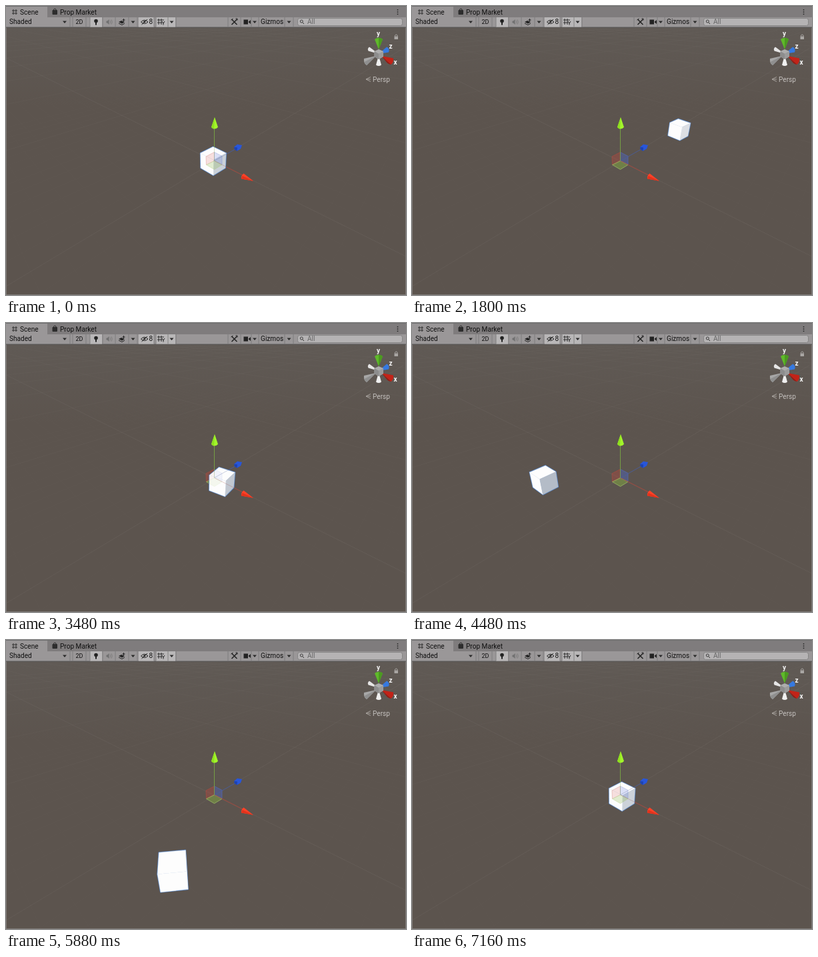
Animation of 600 by 434 pixels, one loop 7200 ms. Source, as an HTML page:

```html
<!DOCTYPE html>
<html lang="en">
<head>
<meta charset="utf-8">
<title>Cube on a figure eight</title>
<style>
  html, body { margin: 0; width: 100%; height: 100%; overflow: hidden; background: #5c544e; }
  svg { display: block; width: 600px; height: 434px; }
  text { font: 10.1px Roboto, "Liberation Sans", Arial, sans-serif; fill: #101010; }
  .axis { font-weight: bold; fill: #f4f4f4; }
</style>
</head>
<body>
<svg viewBox="0 0 600 434">
  <defs>
    <linearGradient id="haze" x2="0" y2="1">
      <stop offset=".07" stop-color="#605a55"/>
      <stop offset=".35" stop-color="#5c544e"/>
    </linearGradient>
  </defs>
  <rect width="600" height="434" fill="url(#haze)"/>
  <g id="grid" stroke="#fff" fill="none"/>

  <!-- move handle, lower part -->
  <g id="planes" stroke-width=".8">
    <path d="M300 226L312.5 219.500V232.500L300.500 238.500Z" fill="#d0483c" fill-opacity=".27" stroke="#c4473c" stroke-opacity=".55"/>
    <path d="M312.500 219.500L324 225.500V238L312.500 232.500Z" fill="#4a68d8" fill-opacity=".32" stroke="#5570cc" stroke-opacity=".6"/>
    <path d="M312.500 232.500L324 238.500L312.500 245.500L300.500 238.500Z" fill="#86b440" fill-opacity=".4" stroke="#a5c86a" stroke-opacity=".75"/>
  </g>
  <g id="shafts" fill="none" stroke-width=".9">
    <path d="M312.500 232.500L355 254" stroke="#a04a40"/>
    <path d="M312.500 232.500L344 215" stroke="#4a5b92"/>
    <path d="M312.500 232.500V183" stroke="#79a545"/>
  </g>

  <g id="cube" stroke-linejoin="round">
    <path id="edge" fill="none" stroke="#4d7fc4" stroke-width="1.8"/>
    <g id="faces" stroke-width=".4"></g>
  </g>

  <!-- move handle, upper part -->
  <use id="ghost" href="#planes"/>
  <use href="#shafts" opacity=".3"/>
  <path d="M312.500 184V180" stroke="#80b83e"/>
  <path d="M313 167L318 182Q313 187 308 182Z" fill="#a2f52a"/>
  <path d="M313 167L308 182Q310 184.500 312 184.700Z" fill="#8fe01f"/>
  <path d="M356.500 251.500Q352.500 254 353 259.500L371 262.800Z" fill="#ff4127"/>
  <path d="M353 259.500L371 262.800L354.500 255Z" fill="#e0331d"/>
  <path d="M342 212L347 207.800L354 209L352 214.500L346.500 217.800L343 215.500Z" fill="#2856da"/>
  <path d="M342 212L347 212.500L346.500 217.800L343 215.500Z" fill="#1d43b0"/>

  <!-- orientation widget -->
  <g>
    <path d="M559 72L545 61.500Q541.500 64 543.500 67.500Z" fill="#e6e6e6"/>
    <path d="M559 72L571 61.500Q576 63.500 574 69.500Z" fill="#3679e0"/>
    <path d="M559 65L553 50Q559 45.500 565 50Z" fill="#5fb92a"/>
    <path d="M559 65L559 47.500Q563 47.500 565 50Z" fill="#4b9a20"/>
    <path d="M555 75L541 89Q536 86 537 79Z" fill="#a7a7a7"/>
    <path d="M555 75L541 89Q538 87 537.500 84Z" fill="#8f8f8f"/>
    <path d="M563 75L581 78.500Q582 84 577.500 88Z" fill="#c22318"/>
    <path d="M563 75L577.500 88Q574.500 87.500 572 85.500Z" fill="#96180f"/>
    <path d="M559 74L555 88.500Q559 91.500 563 88.500Z" fill="#f0f0f0"/>
    <path d="M552.500 68L559 65L566 68V76L559 80L552.500 76Z" fill="#adadad"/>
    <path d="M552.500 68L559 71.500V80L552.500 76Z" fill="#8d8d8d"/>
    <path d="M566 68L559 71.500V80L566 76Z" fill="#9b9b9b"/>
    <text class="axis" x="556" y="45">y</text>
    <text class="axis" x="574.500" y="64">z</text>
    <text class="axis" x="581.500" y="88">x</text>
    <rect x="582.500" y="45.500" width="5.500" height="4.500" fill="#a9a6a3"/>
    <path d="M583.500 45.500V44Q585.200 41.500 587 44V45.500" fill="none" stroke="#a9a6a3"/>
    <path d="M547 106.500L540 110L547 113.500M540 110H547" fill="none" stroke="#b0aca8" stroke-width=".9"/>
    <text x="550" y="113.500" style="fill:#c4c1be">Persp</text>
  </g>

  <!-- window frame, tabs -->
  <path d="M.5 17V434M599.500 17V434M0 433.500H600" stroke="#7b7774"/>
  <rect width="600" height="17" fill="#7f7c7d"/>
  <rect width="600" height="1" fill="#6d6d6d"/>
  <rect y="1" width="62" height="16" fill="#9a9798"/>
  <path d="M11 5V13M15 5V13M9 7H17M9 11H17" stroke="#333"/>
  <text x="21" y="12.800">Scene</text>
  <rect x="69.500" y="6" width="7.500" height="7" rx="1" fill="#2d2d2d"/>
  <path d="M71.500 6V5Q73.200 3 75 5V6" fill="none" stroke="#2d2d2d"/>
  <text x="81" y="12.800">Prop Market</text>
  <path d="M587.500 5V13" stroke="#222" stroke-width="1.500" stroke-dasharray="1.500 1.700"/>

  <!-- toolbar -->
  <rect y="17" width="600" height="15" fill="#9a9798"/>
  <path d="M0 32H600" stroke="#555"/>
  <g fill="#b9b7b8">
    <rect x="126" y="17" width="18" height="14.500"/>
    <rect x="199" y="17" width="23" height="14.500"/>
    <rect x="225" y="17" width="29" height="14.500"/>
  </g>
  <path id="seps" stroke="#787878" stroke-width=".8"/>
  <path id="downs" fill="#2a2a2a"/>
  <text x="5" y="27.300">Shaded</text>
  <text x="104.500" y="27.300" style="font-size:9px">2D</text>
  <circle cx="135" cy="22.500" r="2.800" fill="#222"/>
  <path d="M135 24V28.500" stroke="#222" stroke-width="2"/>
  <path d="M150.500 22.500H152L154.500 20V28L152 25.500H150.500Z" fill="#707070"/>
  <path d="M156 21.500Q158 24 156 26.500M158 20.500Q160.500 24 158 27.500" fill="none" stroke="#777" stroke-width=".8"/>
  <path d="M169 24L173 22L178 24L174 26.500Z" fill="#222"/>
  <path d="M169 26L174 28.500L178 26M176.500 19V23M174.500 21H178.500" fill="none" stroke="#222"/>
  <path d="M202.500 24Q207.500 18.500 213 24Q207.500 29 202.500 24ZM203.500 28L212 20" fill="none" stroke="#222"/>
  <circle cx="207.700" cy="23.800" r="1.500" fill="#222"/>
  <text x="214.500" y="27.300">8</text>
  <path d="M229 19V28M233 19V28M227 21H237M227 25H234" stroke="#222" stroke-width=".9"/>
  <path d="M234 23L236 26L238 23M236 26V28.500" fill="none" stroke="#222"/>
  <path d="M338.500 20L346.500 28M346.500 20L338.500 28" stroke="#222" stroke-width="1.500"/>
  <path d="M337.500 21L340.500 19M344.500 19H347V21.500" fill="none" stroke="#222"/>
  <path d="M356.500 20.500H363V27.500H356.500ZM363.500 24L367 21V27Z" fill="#222"/>
  <text x="382" y="27.300">Gizmos</text>
  <rect x="437.500" y="18.500" width="157" height="11" rx="3" fill="#b5b3b4" stroke="#7d7d7d" stroke-width=".8"/>
  <circle cx="443.300" cy="23" r="2" fill="none" stroke="#333" stroke-width=".9"/>
  <path d="M444.700 24.500L447 27" stroke="#333"/>
  <text x="452" y="27.200" style="fill:#666">All</text>
</svg>

<script>
const NS = "http://www.w3.org/2000/svg";
const byId = id => document.getElementById(id);
const add = (parent, name) => parent.appendChild(document.createElementNS(NS, name));
const rad = deg => deg * Math.PI / 180;

// Camera
const FOCAL = 348, DIST = 12.3, SHIFT = 0.4525;
const SP = Math.sin(rad(33)), CP = Math.cos(rad(33));
const SY = Math.sin(rad(43.2)), CY = Math.cos(rad(43.2));
const EYE = [-CY * SHIFT + SY * CP * DIST, SP * DIST, -SY * SHIFT - CY * CP * DIST];
const LIGHT = [0.32, 0.766, -0.557];
const SIZE = 0.945; // cube edge and floor unit

function project([x, y, z]) {
  const side = SHIFT + CY * x + SY * z;
  const ahead = CY * z - SY * x;
  const depth = DIST + CP * ahead - SP * y;
  return [300 + FOCAL * side / depth, 233.4 - FOCAL * (SP * ahead + CP * y) / depth];
}

const dot = (a, b) => a[0] * b[0] + a[1] * b[1] + a[2] * b[2];
const pathOf = pts => "M" + pts.map(p => p.map(v => v.toFixed(2)).join(" ")).join("L");

// Floor lines, clipped just in front of the camera
function drawGrid(spacing, count, reach, alpha) {
  for (let k = -count; k <= count; k++) {
    const c = k * spacing * SIZE;
    const zNear = (-13 + SY * c) / CY, xNear = (13 + CY * c) / SY;
    for (const ends of [[[c, 0, zNear], [c, 0, reach]], [[xNear, 0, c], [-reach, 0, c]]]) {
      const line = add(byId("grid"), "path");
      line.setAttribute("d", pathOf(ends.map(project)));
      line.setAttribute("stroke-opacity", alpha);
    }
  }
}

function drawToolbar() {
  byId("seps").setAttribute("d", [96, 100, 120, 126, 145, 164, 184, 197, 222, 225, 243, 255, 333, 352, 368, 379, 418, 431]
    .map(x => `M${x} 17V31.5`).join(""));
  byId("downs").setAttribute("d", [88, 190.5, 248.5, 373, 424.5]
    .map(x => `M${x - 3} 22.5H${x + 3}L${x} 26Z`).join(""));
}

// Two touching circles, one lap each; the cube faces along its path
const RADIUS = 2.84, LAP = 3600, LOOP = 2 * LAP, STEP = 40;

function pose(t) {
  const way = t < LAP ? 1 : -1;
  const turn = (t % LAP) / LAP * 360;
  const lead = way > 0 ? 2 + 3 * Math.sin(rad(turn / 2)) : 2;
  const a = rad(turn + lead);
  return {
    pos: [-RADIUS * Math.sin(a), 0, way * RADIUS * (1 - Math.cos(a))],
    dir: [-Math.cos(a), 0, way * Math.sin(a)]
  };
}

function shade(normal, pos) {
  const toEye = EYE.map((v, i) => v - pos[i]);
  const facing = Math.max(0, dot(normal, toEye)) / Math.hypot(...toEye);
  const dim = Math.max(0, 0.5 - dot(normal, LIGHT)) * facing * 500;
  return `rgb(${[1.08, 0.96, 0.8].map(k => Math.round(253 - dim * k)).join()})`;
}

const faceNodes = [0, 1, 2, 3, 4].map(() => add(byId("faces"), "path"));

function drawCube(t) {
  const { pos, dir } = pose(t);
  const up = [0, 1, 0], right = [dir[2], 0, -dir[0]];
  const neg = v => v.map(n => -n);
  const sides = [[up, dir, right], [dir, up, right], [neg(dir), up, right],
                 [right, up, dir], [neg(right), up, dir]];
  const half = SIZE / 2;
  let outline = "";
  sides.forEach(([n, u, v], i) => {
    const center = pos.map((p, k) => p + n[k] * half);
    const seen = dot(n, EYE.map((e, k) => e - center[k])) > 0;
    const pts = [[1, 1], [1, -1], [-1, -1], [-1, 1]].map(([a, b]) =>
      project(center.map((c, k) => c + (a * u[k] + b * v[k]) * half)));
    const d = seen ? pathOf(pts) + "Z" : "";
    const color = shade(n, pos);
    faceNodes[i].setAttribute("d", d);
    faceNodes[i].setAttribute("fill", color);
    faceNodes[i].setAttribute("stroke", color);
    outline += d;
  });
  byId("edge").setAttribute("d", outline);
  byId("ghost").setAttribute("opacity", Math.hypot(...pos) < 0.36 ? 0.6 : 0.2);
}

drawGrid(1, 14, 18, 0.008);
drawGrid(10, 8, 120, 0.02);
drawGrid(1, 0, 60, 0.025);
drawToolbar();
const start = performance.now();
function tick() {
  const t = (performance.now() - start) % LOOP;
  drawCube(Math.floor(t / STEP) * STEP);
  requestAnimationFrame(tick);
}
tick();
</script>
</body>
</html>
```
